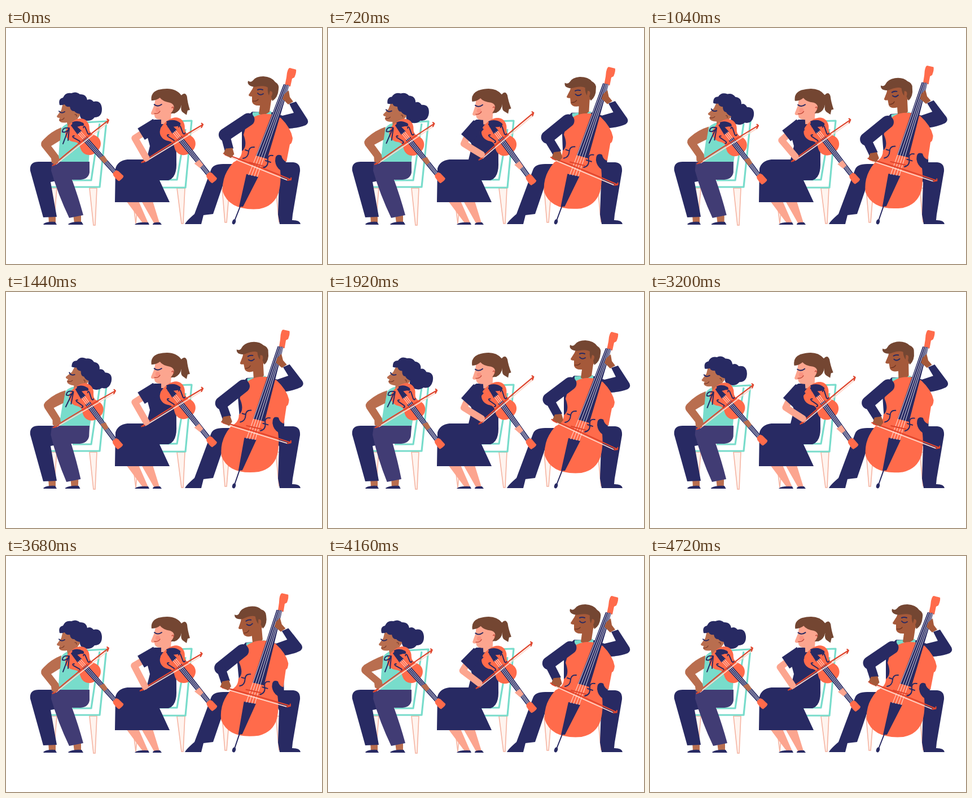
An HTML page for the animation above (4800 ms loop, 560x420 px).

```html
<!DOCTYPE html>
<html lang="en">
<head>
<meta charset="utf-8">
<title>String trio</title>
<style>
html, body { margin: 0; width: 100%; height: 100%; overflow: hidden; background: #fff }
svg { display: block; width: 560px; height: 420px }
.n { fill: #282a63 } .p { fill: #413c74 } .c { fill: #ff6b4b } .t { fill: #78dccb }
.s1 { fill: #b96e4f } .s2 { fill: #fca58f } .s3 { fill: #a5593a } .b { fill: #744632 }
.line { fill: none; stroke: #282a63; stroke-width: 2; stroke-linecap: round; stroke-linejoin: round }
.limb { fill: none; stroke-linejoin: round; stroke-linecap: round }
.chair { fill: none; stroke: #78dccb; stroke-width: 3.2; stroke-linejoin: round }
.leg { fill: #fff4ef; stroke: #f5b4a2; stroke-width: 1.6 }
.string { fill: none; stroke: #fff; stroke-width: .8 }
.red { fill: none; stroke: #df452d; stroke-width: 2.2; stroke-linecap: round; stroke-linejoin: round }
.hair { stroke: #ffd8cc; stroke-width: 1.8 }
</style>
</head>
<body>
<svg viewBox="0 0 560 420">
<defs>
  <g id="violin">
    <path class="c" d="M-36 0C-36-26-16-27-7-18Q0-12 8-17C22-24 34-12 32 0C34 12 22 24 8 17Q0 12-7 18C-16 27-36 26-36 0Z"/>
    <path class="n" d="M-33-3L-13-5V5L-33 3ZM0-5L83-4V4L0 5Z"/>
    <path class="string" d="M-14-3L82-1.8M-14 0H82M-14 3L82 1.8"/>
    <path class="line" d="M-15 11q-3 3 1 3l12-4q4 0 2 3M-15-11q-3-3 1-3l12 4q4 0 2-3"/>
    <path class="c" d="M80-4L84-6 96-7Q99-6 98 5Q96 7 84 6L80 4Z"/>
  </g>
  <g id="bow">
    <path class="hair" d="M6 3H122"/>
    <path class="red" d="M0 1Q60-1 128 0M3 2H10M123 3L128 0 127-3"/>
  </g>
</defs>

<!-- cello -->
<path class="leg" d="M383 285L388 346H391L396 285ZM478 285L484 346 488 285Z"/>
<g class="lean">
  <path class="n" d="M436 149L472 150 490 156 510 151 502 135 514 131 532 159Q539 168 531 173Q519 178 500 179L495 250H418V166Z"/>
  <path class="t" d="M437 150L470 148 471 164 437 166Z"/>
  <g id="head3">
    <path class="s3" d="M441 97L437 108 430 119Q430 122 436 122L436 131Q438 139 450 138L448 153Q458 157 467 149L470 129Q478 122 475 111L463 96Z"/>
    <path class="b" d="M429 94Q434 98 438 93Q443 86 456 86Q471 87 477 96Q485 101 483 109Q482 124 472 130L470 122Q475 113 468 112L466 120Q463 114 464 106Q459 102 446 104Q439 106 433 103Q427 100 429 94Z"/>
    <path class="line" d="M446 116Q450 121 456 117M446 110Q450 108 455 110"/>
    <path class="line" style="stroke:#6d3422;stroke-width:1.3" d="M438 130Q444 131 447 127"/>
  </g>
</g>
<path class="n" d="M363 253Q366 242 385 242H430V275H386L367 331 350 333 346 349H317Q319 344 334 331ZM468 239H509Q522 240 521 255L508 332 507 342Q521 342 522 349H485L482 332 484 275Z"/>
<g id="cello">
  <path class="c" d="M426 172Q440 149 472 154L487 160Q505 178 508 196Q507 206 503 207L497 238Q490 236 488 227Q477 222 477 237Q478 247 486 253Q488 275 483 293Q475 317 449 322Q396 326 384 291Q382 262 403 239Q418 232 418 219Q429 211 421 190Z"/>
  <path class="c" d="M494 103L497 88 498 80Q500 71 503 71L514 74Q515 79 511 88L507 90 504 104Z"/>
  <path class="n" d="M492 100L502 102 463 233 443 227ZM426 260L447 265 420 318 413 318Z"/>
  <path class="line" d="M416 315L405 343"/>
  <ellipse class="n" cx="404" cy="345" rx="3" ry="4.5" transform="rotate(20 404 345)"/>
  <path class="line" d="M440 212Q431 211 430 220Q429 231 420 232M430 219L424 217M473 227Q463 225 464 236Q465 247 455 249M460 236L469 239"/>
  <path class="string" d="M494 101L430 262M497 101L435 263M499 102L440 264M501 102L445 265"/>
  <path class="red" d="M431 239L457 246"/>
</g>
<g class="lean">
  <path class="s3" d="M493 118L501 111 503 123 509 131 500 136 490 126Z"/>
  <use id="bow3" href="#bow"/>
  <path id="upper3" class="limb" stroke="#282a63" stroke-width="23"/>
  <path id="fore3" class="limb" stroke="#282a63" stroke-width="16" style="stroke-linecap:butt"/>
  <path id="hand3" class="s3" d="M388 214L400 213 403 224 397 231 389 226 384 223Z"/>
</g>

<!-- second violin -->
<path class="leg" d="M303 285L311 348H314L317 285ZM225 308L230 348 234 308Z"/>
<path class="chair" d="M298 166L329 165 318 284H275M318 180L303 270H270"/>
<path class="s2" d="M213 308H235L252 347H242ZM240 308H260L272 347H262Z"/>
<path class="n" d="M228 350Q232 345 252 346L254 350ZM260 350Q260 345 273 346L276 350ZM263 163Q248 170 248 184L255 210 249 234H215Q198 236 194 250L193 310H290L272 271H288Q303 266 302 240Q302 190 299 178L291 163Z"/>
<circle cx="276" cy="179" r="2" fill="#fff"/><circle cx="277" cy="189" r="2" fill="#fff"/>
<g id="head2">
  <path class="s2" d="M266 120L263 137 257 151Q257 155 263 154Q263 163 275 163L275 171H291L293 153Q301 148 301 138L290 124Z"/>
  <path class="b" d="M258 129Q256 115 270 110Q299 103 311 120Q318 113 321 122Q322 133 326 146L322 147 320 155 313 150Q309 147 311 137Q309 148 299 152L292 152Q304 138 291 133Q278 131 273 124Q267 129 258 129Z"/>
  <circle cx="269" cy="146" r="4" fill="#fa9280"/>
  <path class="line" d="M263 136Q269 141 276 136"/>
  <path class="line" style="stroke:#c44b3b;stroke-width:1.4" d="M263 152Q270 153 273 148M294 142q3-3 3 2"/>
</g>
<g id="violin2">
  <use href="#violin" transform="translate(307 195) rotate(51) scale(1.02)"/>
  <path class="s2" d="M334 241L343 234 350 243 344 249Z"/>
  <path class="n" d="M284 166Q298 160 309 169Q311 174 303 175L287 177Z"/>
</g>
<use id="bow2" href="#bow"/>
<path id="fore2" class="limb" stroke="#fca58f" stroke-width="12"/>
<path id="sleeve2" class="limb" stroke="#282a63" stroke-width="24" style="stroke-linecap:butt"/>

<!-- first violin -->
<path class="leg" d="M78 285L85 346 90 285ZM148 285L155 351H158L161 285Z"/>
<path class="chair" d="M140 168L178 166 166 283H80M166 170L151 271H118"/>
<g class="sway">
  <path class="t" d="M112 169Q97 174 96 186L92 246H146L150 196 131 170Z"/>
</g>
<path class="s1" d="M75 332H88V347H76Z"/>
<path class="n" d="M43 254Q41 238 58 238H112V268L79 274 90 336 66 337ZM66 349Q72 344 87 345L90 350H67Z"/>
<g id="leg1">
  <path class="s1" d="M119 332H133V347H121Z"/>
  <path class="n" d="M110 349Q118 344 134 345L137 350H111Z"/>
  <path class="p" d="M81 238H148V257Q146 269 132 270H117Q128 300 137 333L112 338Q92 296 80 254Z"/>
</g>
<g class="sway">
  <g id="head1">
    <path class="s1" d="M101 133L98 146 90 157Q90 160 95 160L94 164Q96 170 108 168L110 178H128L127 161Q133 155 131 148L118 136Z"/>
    <path class="n" d="M95 137Q92 126 101 124Q105 114 116 116Q124 112 131 118Q142 117 144 128Q150 125 155 131Q169 128 170 144Q170 159 157 159Q150 168 137 164Q130 160 131 153Q124 152 121 148Q115 149 113 140Q106 141 104 136Q98 138 95 137Z"/>
    <path class="line" d="M94 148Q98 153 104 149"/>
    <path class="line" style="stroke:#7c3d2d;stroke-width:1.3" d="M95 164Q101 164 103 160M122 154q3-1 3 3"/>
  </g>
  <use href="#violin" transform="translate(139 196) rotate(48.3)"/>
  <path class="s1" d="M165 231L174 227 180 236 174 241Z"/>
  <path class="n" d="M117 168Q126 163 137 169Q141 175 133 174L119 178Z"/>
  <path class="line" d="M112 178Q100 176 100 185Q106 187 112 179M111 179L101 206M112 179L110 200"/>
  <use id="bow1" href="#bow"/>
  <path id="arm1" class="s1"/>
</g>
</svg>
<script>
const LOOP = 4800, STEP = 80;
const byId = id => document.getElementById(id);
const turn = (sel, value) =>
  document.querySelectorAll(sel).forEach(el => el.setAttribute('transform', value));
const path = (id, d) => byId(id).setAttribute('d', d);

// Smooth interpolation between [time, value] pairs
function ease(t, keys) {
  const i = keys.findIndex(k => k[0] > t);
  const [t0, v0] = keys[i - 1], [t1, v1] = keys[i];
  const u = (t - t0) / (t1 - t0);
  return v0 + (v1 - v0) * u * u * (3 - 2 * u);
}

const swayKeys = [[0, 0], [1440, 1], [1600, 1], [3600, 0], [4801, 0]];
const footKeys = [[0, 0], [720, 0], [1900, 1], [2350, 1], [3650, 0], [4801, 0]];
const reachKeys = [[0, 0], [320, 1], [660, .1], [1440, 0], [2000, 0], [2480, 1],
  [3050, 0], [3680, 0], [4160, 1], [4640, 0], [4801, 0]];
const leanKeys = [[0, 0], [300, 0], [1300, 1], [1850, 0], [2500, 0], [3600, 1],
  [3680, 1], [4150, 0], [4801, 0]];

function draw(now) {
  const t = Math.floor(now % LOOP / STEP) * STEP;
  const sway = ease(t, swayKeys), foot = ease(t, footKeys);
  const reach = ease(t, reachKeys), lean = ease(t, leanKeys);
  const stroke = (1 - Math.cos(2 * Math.PI * (t - 120) / 1200)) / 2;

  turn('.sway', `translate(${3 * sway} ${-sway}) rotate(${5.5 * sway} 110 225)`);
  turn('#head1', `translate(${3 * sway} ${sway}) rotate(${10 * sway} 120 172)`);
  turn('#leg1', `translate(0 240) skewX(${-4.3 * foot}) translate(0 -240)`);
  turn('#bow1', `translate(${82 - 2 * reach} ${244 - 3 * reach}) rotate(${-38.7 + 3 * sway + 3.5 * reach})`);
  const ex = 62 - 3 * reach, ey = 207 - 4 * reach, hx = 2 * reach, hy = -6 * reach;
  path('arm1', `M98 177Q80 184 ${ex + 5} ${ey - 9}Q${ex - 3} ${ey - 2} ${ex + 2} ${ey + 5}` +
    `L${80 + hx} ${232 + hy} ${81 + hx} ${240 + hy} ${87 + hx} ${243 + hy}` +
    ` ${95 + hx} ${235 + hy} ${93 + hx} ${227 + hy} ${ex + 18} ${ey + 3}L96 200Z`);

  turn('#head2', `rotate(${-4 * stroke} 285 165)`);
  turn('#violin2', `rotate(${3 * stroke} 285 170)`);
  turn('#bow2', `translate(${237 + 30 * stroke} ${239 - 5 * stroke}) rotate(${-30.5 - 10 * stroke})`);
  const cuff = `${239 + 6 * stroke} ${188 + 9 * stroke}`;
  path('fore2', `M${cuff}L${227 + 14 * stroke} ${195 + 11 * stroke} ${246 + 26 * stroke} ${232 - 7 * stroke}`);
  path('sleeve2', `M267 172L${cuff}`);

  turn('.lean', `translate(0 ${2.5 * lean}) rotate(${-5.5 * lean} 455 270)`);
  turn('#head3', `rotate(${-8 * lean} 452 150)`);
  turn('#cello', `rotate(${-2.9 * lean} 404 345)`);
  turn('#bow3', `translate(${385 + 12 * stroke} ${222 + 4 * stroke}) rotate(${21.5 + 3.5 * stroke})`);
  const joint = `${388 + 4 * stroke} ${190 + stroke}`;
  path('upper3', `M429 163L${joint}`);
  path('fore3', `M${joint}L${394 + 14 * stroke} ${216 + 4 * stroke}`);
  turn('#hand3', `translate(${14 * stroke} ${4 * stroke})`);
}

const start = performance.now();
(function frame() {
  draw(performance.now() - start);
  requestAnimationFrame(frame);
})();
</script>
</body>
</html>
```
